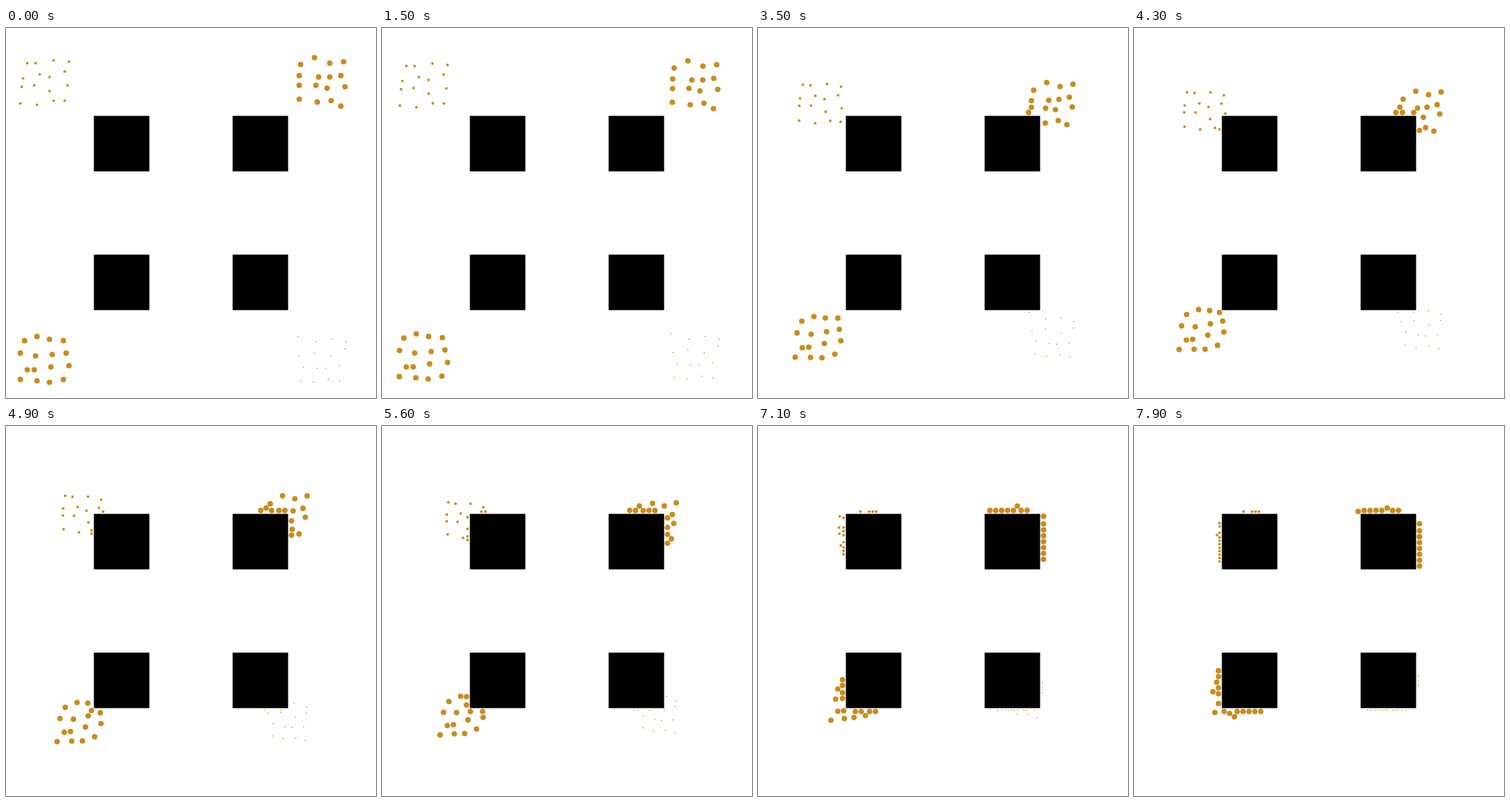
Write an HTML page with a canvas that moves like this. It is 512 px wide and 512 px high and loops after 8000 ms.

```html
<!DOCTYPE html>
<html>
<head>
<meta charset="utf-8">
<style>
html, body { margin: 0; width: 100%; height: 100%; overflow: hidden; background: #fff; }
canvas { display: block; width: 512px; height: 512px; }
</style>
</head>
<body>
<canvas id="stage" width="512" height="512"></canvas>
<script>
const ctx = document.getElementById('stage').getContext('2d');
const UNIT = 1.92, CENTER = 256, NEAR = 30 * UNIT, FAR = 70 * UNIT;
const LOOP = 8000, TICK = 100, DELAY = 12, STEPS = 67;

// Each crowd lives in one quadrant; starts are x, y distances from the centre in units.
const groups = [
  { sx: -1, sy: -1, radius: 1.85, gap: 4.7, wall: 3.2, start: [
    118,108, 112,108, 99,110, 88,109, 121,97, 109,100, 102,98, 91,102,
    122,91, 113,92, 102,88, 89,92, 123,79, 111,78, 99,81, 91,81] },
  { sx: 1, sy: -1, radius: 3.8, gap: 8.15, wall: 4.7, start: [
    79,107, 89,112, 100,108, 110,109, 78,99, 92,98, 100,98, 108,99,
    78,92, 90,92, 98,90, 111,91, 78,82, 91,80, 101,81, 108,77] },
  { sx: -1, sy: 1, radius: 3.8, gap: 8.15, wall: 4.7, start: [
    120,92, 111,89, 102,91, 92,92, 123,101, 112,103, 100,102, 90,101,
    118,113, 113,113, 101,111, 88,110, 123,120, 111,121, 102,122, 92,120] },
  { sx: 1, sy: 1, radius: 0.8, gap: 3.3, wall: 2.9, start: [
    77,89, 90,93, 102,91, 112,93, 78,103, 89,101, 101,103, 111,98,
    81,111, 91,112, 97,112, 107,110, 79,121, 88,122, 99,120, 107,121] }
];

const clamp = v => Math.max(NEAR, Math.min(FAR, v));
const beside = v => v > NEAR && v < FAR;

// Head for the centre, sliding along a block's outer face when touching it.
function walk(p, wall) {
  const d = Math.hypot(p.x, p.y);
  let vx = -UNIT * p.x / d, vy = -UNIT * p.y / d;
  const touches = v => v >= FAR && v < FAR + wall + 0.1;
  if (beside(p.x) && touches(p.y)) { vx = vx / 2 - 0.65; vy = 0; }
  else if (beside(p.y) && touches(p.x)) { vy = vy / 2 - 0.65; vx = 0; }
  p.x += vx;
  p.y += vy;
}

function separate(a, b, gap) {
  const dx = b.x - a.x, dy = b.y - a.y, d = Math.hypot(dx, dy) || 1;
  if (d >= gap) return;
  const k = (gap - d) / d / 2;
  a.x -= dx * k; a.y -= dy * k;
  b.x += dx * k; b.y += dy * k;
}

function leaveBlock(p, wall) {
  const cx = clamp(p.x), cy = clamp(p.y);
  const dx = p.x - cx, dy = p.y - cy, d = Math.hypot(dx, dy) || 1;
  if (d >= wall) return;
  p.x = cx + dx * wall / d;
  p.y = cy + dy * wall / d;
}

function simulate({ start, gap, wall }) {
  let crowd = [];
  for (let i = 0; i < start.length; i += 2)
    crowd.push({ x: start[i] * UNIT, y: start[i + 1] * UNIT });
  const history = [crowd];
  for (let s = 0; s < STEPS; s++) {
    crowd = crowd.map(p => ({ ...p }));
    crowd.forEach(p => walk(p, wall));
    for (let n = 0; n < 12; n++) {
      crowd.forEach((a, i) => crowd.slice(i + 1).forEach(b => separate(a, b, gap)));
      crowd.forEach(p => leaveBlock(p, wall));
    }
    history.push(crowd);
  }
  return history;
}

groups.forEach(g => g.history = simulate(g));

function draw(time) {
  const step = Math.max(0, Math.floor(time % LOOP / TICK) - DELAY);
  ctx.fillStyle = '#fff';
  ctx.fillRect(0, 0, 512, 512);
  ctx.fillStyle = '#000';
  for (const { sx, sy } of groups) {
    const mid = (NEAR + FAR) / 2, size = FAR - NEAR;
    ctx.fillRect(CENTER + sx * mid - size / 2, CENTER + sy * mid - size / 2, size, size);
  }
  ctx.fillStyle = '#c88c1e';
  for (const { sx, sy, radius, history } of groups)
    for (const p of history[step]) {
      ctx.beginPath();
      ctx.arc(CENTER + sx * p.x, CENTER + sy * p.y, radius, 0, 2 * Math.PI);
      ctx.fill();
    }
}

const begin = performance.now();
function frame() {
  draw(performance.now() - begin);
  requestAnimationFrame(frame);
}
frame();
</script>
</body>
</html>
```
